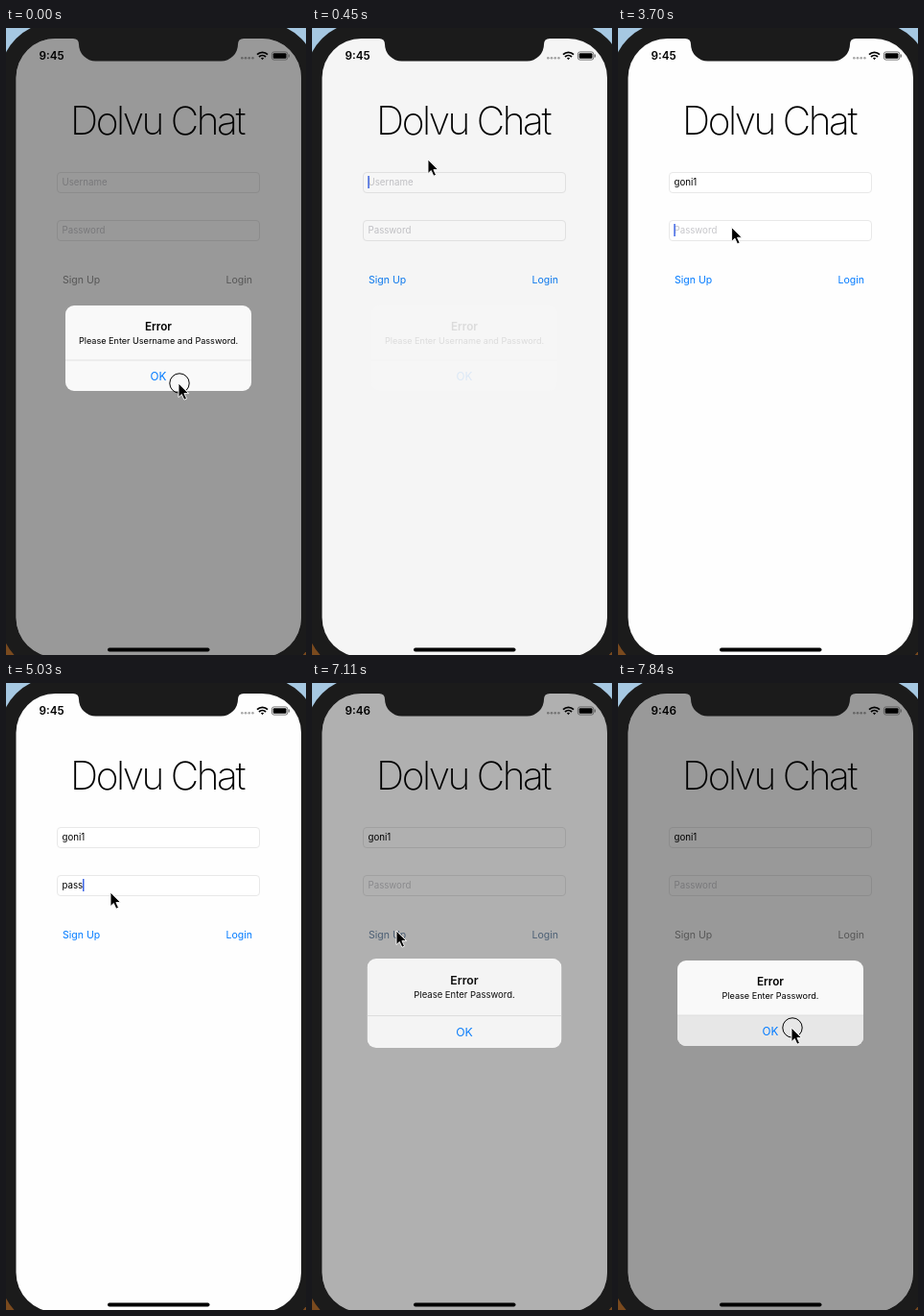
Recreate the animation shown at these times as an HTML page. Size 313 px wide and 653 px high, loop 7990 ms.

```html
<!DOCTYPE html>
<html lang="en">
<head>
<meta charset="utf-8">
<title>Login form</title>
<style>
  html, body { margin: 0; width: 100%; height: 100%; overflow: hidden; }
  svg { display: block; width: 313px; height: 653px; }
  text { font-family: Inter, Roboto, sans-serif; white-space: pre; }
  .mid { text-anchor: middle; }
  .title { font-size: 40.5px; font-weight: 200; letter-spacing: -.06em; }
  .input { font-size: 9.7px; }
  .box { fill: #fff; stroke: #e8e8e8; }
  .button { font-size: 10.5px; }
  .bold { font-size: 11.7px; font-weight: 600; }
  .message { font-size: 9.1px; }
  .ok { font-size: 11.7px; fill: #007aff; }
</style>
</head>
<body>
<svg viewBox="0 0 313 653">
  <defs>
    <linearGradient id="wall" x2="0" y2="1">
      <stop offset=".3" stop-color="#a6c8e2"/>
      <stop offset=".9" stop-color="#7a4a1e"/>
    </linearGradient>
    <clipPath id="card"><rect x="62" y="289" width="194" height="89" rx="9"/></clipPath>
  </defs>
  <rect width="313" height="653" fill="url(#wall)"/>
  <rect x="-6.5" y="-6" width="331.5" height="678" rx="58" fill="#1b1b1b"/>
  <rect x="10.5" y="11" width="297.5" height="644" rx="41" fill="#fefefe"/>

  <text class="title mid" x="157.5" y="111">Dolvu Chat</text>
  <rect class="box" x="53.5" y="150.5" width="211" height="21" rx="3.5"/>
  <rect class="box" x="53.5" y="200.5" width="211" height="21" rx="3.5"/>
  <text class="input" id="user" x="58.5" y="164.3"></text>
  <text class="input" id="pass" x="58.5" y="214.3"></text>
  <rect id="caret" width="1.5" height="13" fill="#3f66e6"/>
  <g id="hint">
    <rect x="56.5" y="168.5" width="35" height="15" rx="3" fill="#fff" stroke="#d0d0d0"/>
    <text class="input" x="59" y="179.5" fill="#007aff">Goni ×</text>
  </g>
  <text class="button" id="signUp" x="59" y="265.5">Sign Up</text>
  <text class="button" id="login" x="229.5" y="265.5">Login</text>

  <g fill="#a8a8a8">
    <circle cx="246.3" cy="31.3" r="1.3"/><circle cx="250" cy="31.3" r="1.3"/>
    <circle cx="253.7" cy="31.3" r="1.3"/><circle cx="257.4" cy="31.3" r="1.3"/>
  </g>
  <rect id="dim" x="10.5" y="11" width="297.5" height="644" rx="41"/>

  <path d="M70 10v1q6 0 6 6a17.5 17.5 0 0 0 17.5 17.5h131a17.5 17.5 0 0 0 17.5-17.5q0-6 6-6v-1z" fill="#1b1b1b"/>
  <text class="bold" id="clock" x="34.5" y="33"></text>
  <g fill="none" stroke="#000" stroke-width="1.8">
    <path d="M262 27.6a7.8 7.8 0 0 1 11 0M264 30a5 5 0 0 1 7 0"/>
    <path d="M267.5 33.2l-1.6-1.9q1.6-1.2 3.2 0z" fill="#000" stroke="none"/>
    <rect x="277.4" y="24.9" width="16.4" height="8.2" rx="2.2" stroke-width=".8" stroke="#555"/>
    <rect x="278.7" y="26.2" width="13.8" height="5.6" rx="1.1" fill="#000" stroke="none"/>
    <path d="M295.2 27.6v2.8" stroke-width="1.1" stroke="#555"/>
  </g>
  <rect x="106" y="645.5" width="106.5" height="4" rx="2"/>

  <g id="alert">
    <g clip-path="url(#card)">
      <rect x="62" y="289" width="194" height="89" fill="#fff" opacity=".94"/>
      <rect id="pressed" x="62" y="346" width="194" height="32" fill="#e7e7e7"/>
      <path d="M62 346h194" stroke="#dadada" stroke-width=".8"/>
    </g>
    <text class="bold mid" x="159" y="314.5">Error</text>
    <text class="message mid" id="message" x="159" y="328.6"></text>
    <text class="ok mid" x="159" y="366.6">OK</text>
  </g>

  <g id="cursor">
    <circle id="ring" cx="1" r="10.2" fill="none" stroke="#000"/>
    <path d="M0 0v14.6l3.3-3.1 2.6 5.7 2.6-1.1-2.6-5.5h4.7z" stroke="#fff" stroke-width=".9"/>
  </g>
</svg>
<script>
const LOOP = 7990, TICK = 148, LAST = 53;
const ui = Object.fromEntries([...document.querySelectorAll('[id]')].map(e => [e.id, e]));

// Keys are [tick, ...values]
const cursorPath = [[0, 180, 370], [1, 178, 362], [3, 121, 137], [5, 129, 159], [7, 131, 162],
  [23, 131, 162], [28, 100, 276], [31, 95, 262], [34, 109, 218], [42, 109, 218],
  [46, 86, 258], [47, 86, 258], [48, 88, 258], [50, 160, 338], [52, 181, 359]];
const alertPath = [[0, 1], [1, .9], [2, .42], [3, .085], [4, 0], [47, 0], [48, .77], [49, .95], [50, 1]];

function along(path, n) {
  const i = path.findIndex(key => key[0] > n);
  if (i < 0) return path[path.length - 1].slice(1);
  const a = path[i - 1], b = path[i], f = (n - a[0]) / (b[0] - a[0]);
  return a.slice(1).map((v, j) => v + (b[j + 1] - v) * f);
}

const typed = (word, ticks, n) => word.slice(0, ticks.filter(k => k <= n).length);
const show = (el, on) => el.setAttribute('visibility', on ? 'visible' : 'hidden');

function fill(el, value, placeholder) {
  el.textContent = value || placeholder;
  el.setAttribute('fill', value ? '#000' : '#c6c6ca');
  return value ? el.getComputedTextLength() : 0;
}

function draw(n) {
  const user = typed('goni1', [11, 12, 13, 14, 18], n);
  const pass = n < 37 ? typed('pass', [29, 31, 32, 33], n) : 'pass'.slice(0, Math.max(0, 40 - n));
  const userWidth = fill(ui.user, user, 'Username');
  const passWidth = fill(ui.pass, pass, 'Password');
  const onUser = n < 22;
  ui.caret.setAttribute('x', 58.3 + (onUser ? userWidth : passWidth));
  ui.caret.setAttribute('y', onUser ? 154 : 204);
  show(ui.caret, n >= 2 && n < 46);
  show(ui.hint, n === 17);

  const [k] = along(alertPath, n);
  const tint = `rgb(${142 * k},${122 + 20 * k},${255 - 113 * k})`;
  ui.signUp.setAttribute('fill', tint);
  ui.login.setAttribute('fill', tint);
  ui.signUp.setAttribute('opacity', n === 46 || n === 47 ? .25 : 1);
  ui.dim.setAttribute('opacity', .4 * k);

  const scale = n > 40 ? 1 + .2 * (1 - k) : 1;
  ui.alert.setAttribute('opacity', Math.min(1, k * 1.2));
  ui.alert.setAttribute('transform', `translate(159 333.5) scale(${scale}) translate(-159 -333.5)`);
  ui.message.textContent = `Please Enter ${n < 40 ? 'Username and ' : ''}Password.`;
  show(ui.pressed, n === LAST);

  ui.clock.textContent = n < 45 ? '9:45' : '9:46';
  ui.cursor.setAttribute('transform', `translate(${along(cursorPath, n)})`);
  show(ui.ring, n === 0 || n === 46 || n === LAST);
}

function play() {
  const t = performance.now() % LOOP;
  draw(Math.min(LAST, Math.floor((t + 12) / TICK)));
  requestAnimationFrame(play);
}
play();
</script>
</body>
</html>
```
